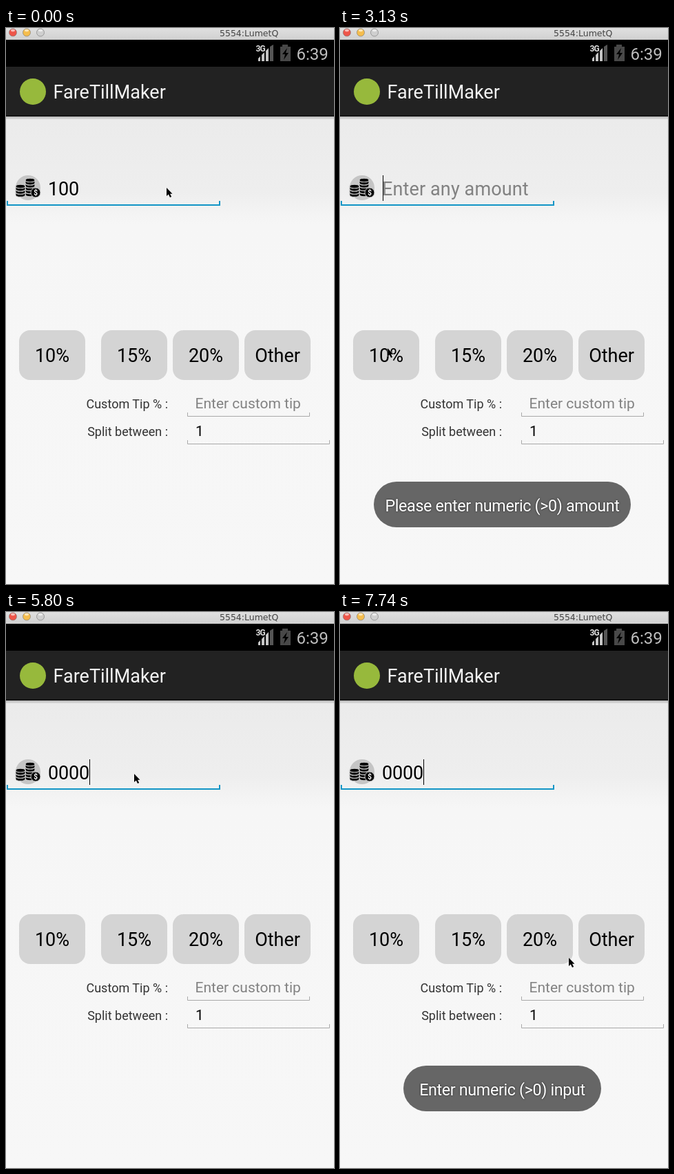
An HTML page that plays this animation: 476 by 804 pixels, repeating every 8 s.

```html
<!DOCTYPE html>
<html lang="en">
<head>
<meta charset="utf-8">
<title>Tip app demo</title>
<style>
html, body { margin: 0; width: 100%; height: 100%; overflow: hidden; background: #f7f7f7; }
svg { display: block; width: 476px; height: 804px; }
text { font-family: Roboto, sans-serif; font-size: 27px; white-space: pre; }
#amount { letter-spacing: -.15px; }
#amount.hint { letter-spacing: .13px; }
.label { font-size: 18px; fill: #333; text-anchor: end; }
.field { font-size: 21px; }
.hint { fill: #828282; }
.line { fill: none; stroke: #a9a9a9; }
#toast text { font-size: 23.3px; font-stretch: 75%; letter-spacing: -.35px; fill: #fff; text-anchor: middle; text-shadow: 0 0 3px #0009; }
</style>
</head>
<body>
<svg viewBox="0 0 476 804">
  <defs>
    <linearGradient id="chrome" x2="0" y2="1"><stop stop-color="#e0e0e0"/><stop offset="1" stop-color="#d0d0d0"/></linearGradient>
    <linearGradient id="page" x2="0" y2="1"><stop stop-color="#ebebeb"/><stop offset=".16" stop-color="#eee"/><stop offset=".23" stop-color="#f6f6f6"/><stop offset="1" stop-color="#f7f7f7"/></linearGradient>
    <linearGradient id="shade" x2="0" y2="1"><stop stop-color="#b8b8b8"/><stop offset="1" stop-color="#dedede"/></linearGradient>
  </defs>

  <!-- Window and status bar -->
  <rect width="476" height="17" fill="url(#chrome)"/>
  <g id="lights"></g>
  <text x="310" y="12" fill="#444" style="font:12.5px 'DejaVu Sans',sans-serif">5554:LumetQ</text>
  <rect y="17" width="476" height="39"/>
  <text x="362.5" y="34" fill="#ddd" style="font:bold 12px Roboto,sans-serif;letter-spacing:-1px">3G</text>
  <path d="M366 48v-4l3-3v7zM371 48v-9l4-4v13zM377 48v-15l4-4v19z" fill="#c4c4c4"/>
  <path d="M383 48V27l5-3v24z" fill="#555"/>
  <path d="M401 24h8v3h4v21h-15V27h3z" fill="#484848"/>
  <path d="M408 29l-7 9h4l-2 8 7-10h-4z"/>
  <text x="421.5" y="46" fill="#bebebe" style="font-size:24px">6:39</text>

  <!-- Action bar -->
  <rect y="56" width="476" height="72" fill="#222"/>
  <rect y="126" width="476" height="2" fill="#151515"/>
  <circle cx="39" cy="92" r="19" fill="#97b93c"/>
  <text x="68.5" y="102" fill="#f3f3f3">FareTillMaker</text>
  <rect y="128" width="476" height="676" fill="url(#page)"/>
  <rect y="128" width="476" height="4" fill="url(#shade)"/>

  <!-- Amount -->
  <circle cx="32" cy="231" r="18" fill="#c5c5c5"/>
  <g id="coins" stroke="#ccc" stroke-width="1.1"></g>
  <circle cx="43" cy="238" r="7" stroke="#ccc"/>
  <text x="43" y="242" fill="#fff" text-anchor="middle" style="font:bold 10px Roboto,sans-serif">$</text>
  <text id="amount" x="61" y="242"></text>
  <rect id="caret" y="213" width="1" height="37"/>
  <path d="M2 250v6h308v-6" class="line" style="stroke:#1295c6;stroke-width:2"/>

  <g id="buttons" text-anchor="middle"></g>

  <text class="label" x="235" y="550">Custom Tip % :</text>
  <text class="field hint" x="274.5" y="550">Enter custom tip</text>
  <path d="M263.5 556v5.5h177V556" class="line"/>
  <text class="label" x="235" y="590">Split between :</text>
  <text class="field" x="275" y="590">1</text>
  <path d="M263.5 596v5.5h206V596" class="line"/>

  <g id="toast"><rect y="656" height="66" rx="33" fill="#666"/><text x="235.5" y="699"></text></g>
  <path id="mouse" d="M0 0V12L2.8 9.5 5 14 7.2 13 5 8.7H8.5Z" stroke="#fff" stroke-width=".8" paint-order="stroke"/>
</svg>
<script>
const $ = id => document.getElementById(id);
const set = (el, attrs) => { for (const k in attrs) el.setAttribute(k, attrs[k]); };
const clamp = v => Math.max(0, Math.min(1, v));
const LOOP = 8000, TICK = 148.8; // the screen refreshes once per tick

$('lights').innerHTML = ['#ee5549', '#f5bd4d', '#cfcfcf'].map((fill, i) => {
  const x = 10 + 20 * i;
  return `<circle cx="${x}" cy="6.5" r="5.5" fill="${fill}" stroke="#777" stroke-opacity=".6"/>
    <ellipse cx="${x}" cy="3.5" rx="3" ry="1.8" fill="#fff" opacity=".6"/>`;
}).join('');

const stack = (x, top, n) => Array.from({length: n}, (_, i) => {
  const y = top + (n - 1 - i) * 4.2;
  return `<path d="M${x - 7} ${y}v4a7 3 0 0 0 14 0v-4z"/><ellipse cx="${x}" cy="${y}" rx="7" ry="2.8"/>`;
}).join('');
$('coins').innerHTML = stack(35, 220, 5) + stack(21, 229, 3);

$('buttons').innerHTML = [[19, '10%'], [138, '15%'], [242, '20%'], [346, 'Other']].map(([x, label]) =>
  `<rect x="${x}" y="437" width="96" height="72" rx="16" fill="#d4d4d4"/><text x="${x + 48}" y="483">${label}</text>`).join('');

// Three deletions, then four zeros; values are ticks.
const keys = [3, 4, 5, 27, 28, 29, 38];

// Pointer strokes: first tick, last tick, destination.
const home = [233, 231];
const strokes = [
  [8, 12, 69, 463], [21, 24, 166, 139], [24, 25, 161, 170], [31, 34, 180, 191],
  [37, 39, 186, 234], [39, 43, 64, 534], [43, 44, 208, 475], [50, 52, 332, 500]
];

const toasts = [
  {from: 16.6, to: 34, width: 373, text: 'Please enter numeric (>0) amount'},
  {from: 44, to: 60, width: 287, text: 'Enter numeric (>0) input'}
];

// Strokes bend: y eases out while x eases in and out.
function pointer(tick) {
  return strokes.reduce(([x, y], [start, end, toX, toY]) => {
    const p = clamp((tick - start) / (end - start));
    return [x + (toX - x) * p * p * (3 - 2 * p), y + (toY - y) * Math.sin(p * Math.PI / 2)];
  }, home);
}

function drawAmount(tick) {
  const pressed = keys.filter(k => k <= tick);
  const n = pressed.length;
  const value = n < 3 ? '100'.slice(0, 3 - n) : '0'.repeat(n - 3);
  $('amount').textContent = value || 'Enter any amount';
  set($('amount'), {class: value ? '' : 'hint'});

  // The caret restarts its half-second blink at each key press.
  const idle = (tick - pressed.at(-1)) * TICK + 54;
  set($('caret'), {
    x: Math.round(62 + 14.8 * value.length),
    opacity: n && Math.floor(idle / 500) % 2 === 0 ? 1 : 0
  });
}

function drawToast(tick) {
  const {from, to, width, text} = toasts.find(toast => tick <= toast.to);
  const [pill, message] = $('toast').children;
  set(pill, {x: 235.5 - width / 2, width});
  message.textContent = text;
  set($('toast'), {opacity: clamp(Math.min((tick - from) / 4, (to - tick) / 3.1))});
}

function draw(now) {
  const tick = Math.floor(now % LOOP / TICK + .05);
  set($('mouse'), {transform: `translate(${pointer(tick)})`});
  drawAmount(tick);
  drawToast(tick);
  requestAnimationFrame(draw);
}
draw(0);
</script>
</body>
</html>
```
